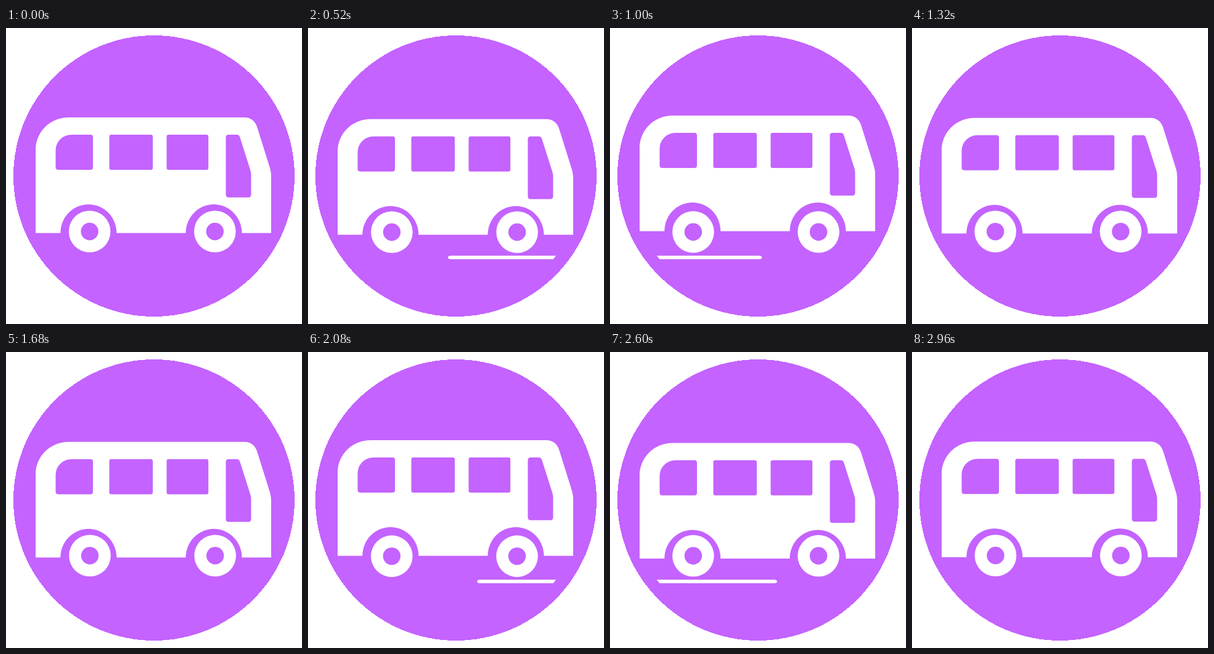
These frames come from a looping animation (480x480 px, 3000 ms). An HTML page:

```html
<!DOCTYPE html>
<html lang="en">
<head>
<meta charset="utf-8">
<title>Bus</title>
<style>
html, body { margin: 0; width: 100%; height: 100%; overflow: hidden; background: #fff; }
svg { display: block; width: 100vw; height: 100vh; }
.paint { fill: #c463ff; }
.white { fill: #fff; }
</style>
</head>
<body>
<svg viewBox="0 0 480 480">
  <defs>
    <clipPath id="road"><circle cx="239" cy="240" r="208.2"/></clipPath>
    <g id="wheel">
      <circle class="white" r="33.8"/>
      <circle class="paint" r="14.2"/>
    </g>
  </defs>
  <circle class="paint" cx="240" cy="240" r="228" shape-rendering="crispEdges"/>
  <g id="body">
    <path class="white" d="M48 332.5V198C48 168 72 145 102 145H387C396 145 404 150.5 407 160L428 227Q430 233 430 241V332.5H382.5A45.5 46.5 0 0 0 291.5 332.5H179.3A45.5 46.5 0 0 0 88.3 332.5Z"/>
    <path class="paint" d="M80.5 199C80.5 184 92 173 107 173H137Q141 173 141 177V226Q141 230 137 230H85Q80.5 230 80.5 225.5Z"/>
    <rect class="paint" x="167.5" y="173" width="70.5" height="57" rx="3"/>
    <rect class="paint" x="260.5" y="173" width="67.7" height="57" rx="3"/>
    <path class="paint" d="M356.5 177.500Q356.500 173 361 173H374Q378 173 379.300 177L396.300 230.500Q397.500 234 397.500 238V270Q397.500 274.700 393 274.700H361Q356.500 274.700 356.500 270Z"/>
  </g>
  <use class="wheel" href="#wheel"/>
  <use class="wheel" href="#wheel"/>
  <g class="white" clip-path="url(#road)">
    <rect class="streak" y="369.2" width="293" height="5.8" rx="5" ry="2.9"/>
    <rect class="streak" y="369.2" width="293" height="5.8" rx="5" ry="2.9"/>
  </g>
</svg>
<script>
const LOOP = 3000, STEP = 40;
const bounce = [0, 3, -3, 3, -3, 3, 0]; // one value every 500 ms
const axles = [135.5, 338.7];
const streakTimes = [520, 2163];        // when each streak's front reaches x = 227
const SPEED = 0.57;

const body = document.getElementById("body");
const wheels = document.querySelectorAll(".wheel");
const streaks = document.querySelectorAll(".streak");

function bounceAt(t) {
  const i = Math.floor(t / 500), k = t / 500 - i;
  return bounce[i] + (bounce[i + 1] - bounce[i]) * k;
}

function draw(t) {
  body.setAttribute("transform", `translate(0 ${bounceAt(t)})`);

  // The wheels turn slightly off their axles, two turns per loop.
  const angle = t / 1500 * 2 * Math.PI - 1.4;
  const dx = 0.6 * Math.cos(angle), dy = 0.6 * Math.sin(angle);
  wheels.forEach((wheel, i) =>
    wheel.setAttribute("transform", `translate(${axles[i] + dx} ${330.6 + dy})`));

  streaks.forEach((streak, i) =>
    streak.setAttribute("x", 227 - SPEED * (t - streakTimes[i])));
}

const start = performance.now();
function tick() {
  const t = (performance.now() - start) % LOOP;
  draw(Math.floor(t / STEP) * STEP);
  requestAnimationFrame(tick);
}
tick();
</script>
</body>
</html>
```
